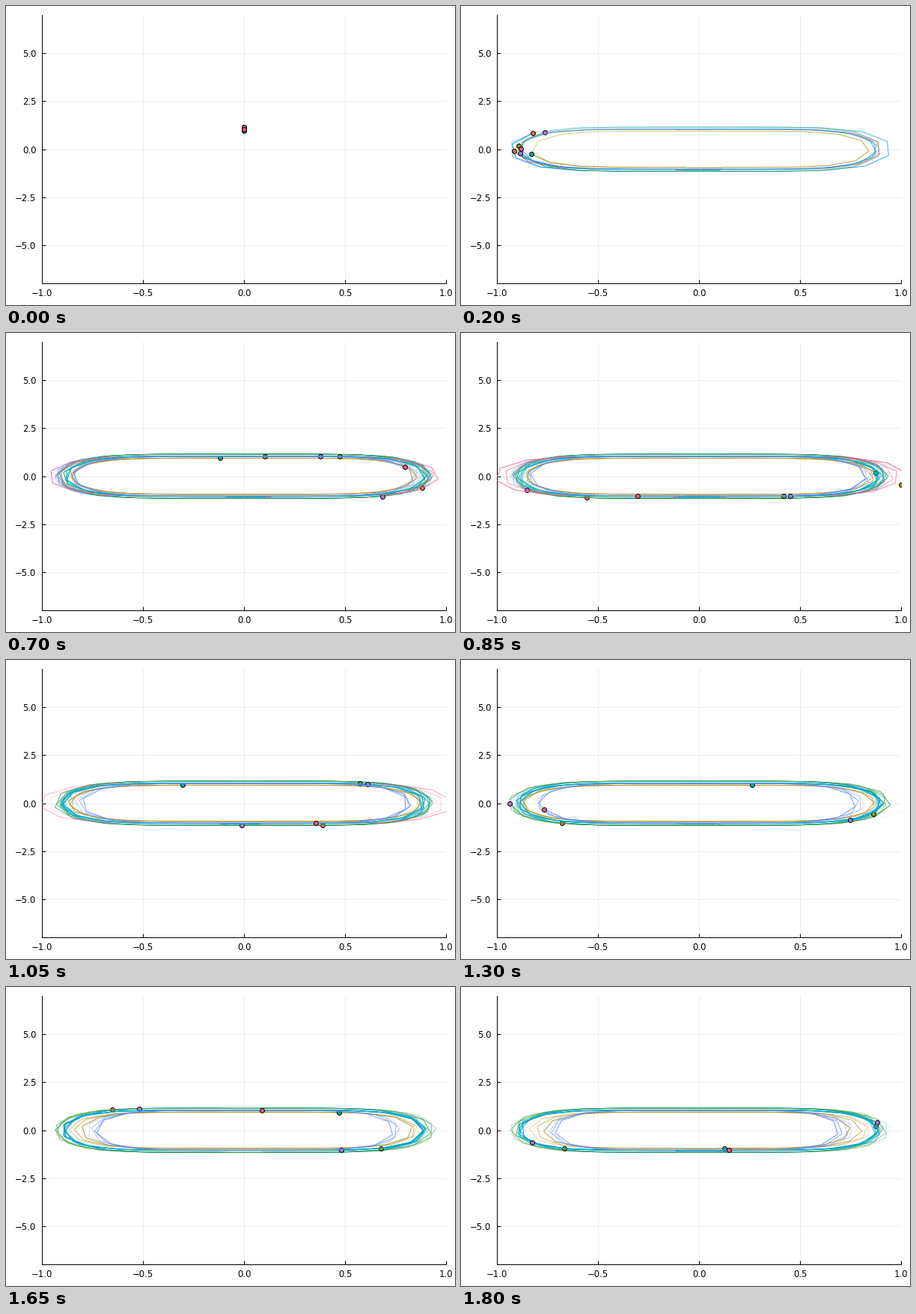
Recreate the animation shown at these times as a matplotlib script. Size 600 by 400 pixels, loop 1850 ms.

```python
import numpy as np
import matplotlib.pyplot as plt
from matplotlib.animation import FuncAnimation
from matplotlib.collections import LineCollection
from matplotlib.colors import to_rgb

DPI = 100
PX = 72 / DPI            # one pixel in points
FRAMES, INTERVAL = 37, 50
STEPS = 10               # path vertices per frame
TAIL = 100               # vertices kept in the fading trail
POWER = 6                # potential ~ |x|^POWER

plt.rcParams["font.family"] = "DejaVu Sans"


class Oscillator:
    """Anharmonic oscillator whose loop rate and reach change slowly."""

    def __init__(self, line, fill, speed, rate, reach, escape=None):
        self.line, self.fill = to_rgb(line), fill
        t = np.arange((FRAMES - 1) * STEPS + 1) / STEPS
        u = t / (FRAMES - 1)

        base, drift, bend = rate
        loops = t * (base + drift * u + bend * ((t - 22) / 14) ** 2)
        start, slope, late = reach
        amp = start + slope * u + late * u ** 6
        if escape:
            amp = start + slope * u ** 3
        amp += 0.008 * np.sin(2.3 * t + 40 * speed)

        x, p = orbit(loops)
        self.path = np.column_stack([amp * x, speed * p])
        if escape:
            self.path[t > escape] = np.nan


def unit_orbit():
    """Quarter of the orbit: position and momentum against time in 0..1."""
    w = np.linspace(0, 1, 2001)
    v = 1 - (1 - w) ** 2
    p = np.sqrt(np.maximum(0, 1 - v ** POWER))
    mid = (w[1:] + w[:-1]) / 2
    vm = 1 - (1 - mid) ** 2
    dt = 2 * (1 - mid) / np.sqrt(1 - vm ** POWER)
    t = np.concatenate([[0], np.cumsum(dt)])
    return t / t[-1], v, p


QT, QV, QP = unit_orbit()


def orbit(loops):
    quarter = (loops % 1) * 4
    up = quarter % 2
    fold = np.where(up > 1, 2 - up, up)
    x = np.interp(fold, QT, QV) * np.where(quarter < 2, 1, -1)
    p = np.interp(fold, QT, QP) * np.where((quarter < 1) | (quarter > 3), 1, -1)
    return x, p


def label(v):
    return f"{v:.1f}".replace("-", "\u2212")


# rate: loops per frame, drift, bend; reach: start, slope, late change
swarm = [
    Oscillator("#009AFA", "#E36F47", 1.15, (.4482, 0, .0028), (.95, -.07, 0)),
    Oscillator("#3EA44E", "#C371D2", 1.15, (.4550, -.0043, 0), (.89, .09, -.08)),
    Oscillator("#AC8E18", "#00AAAE", 0.945, (.4251, 0, .0045), (.83, .09, -.185)),
    Oscillator("#ED5E93", "#C68225", 1.05, (.4385, -.0216, 0), (.91, 1.2, 0),
               escape=17.5),
    Oscillator("#00A98D", "#8E971E", 1.05, (.4375, -.0047, .0022), (.89, .03, -.04)),
    Oscillator("#00A8CB", "#9B7FE9", 1.05, (.4340, .0022, 0), (.885, .015, 0)),
    Oscillator("#618DF6", "#F06073", 1.03, (.4355, .0216, 0), (.90, -.16, -.05)),
]

fig = plt.figure(figsize=(6, 4), dpi=DPI, facecolor="white")
ax = fig.add_axes([48.3 / 600, 28.6 / 400, 540 / 600, 359.6 / 400])
ax.set(xlim=(-1, 1), ylim=(-7, 7))
ax.set_axisbelow(True)
ax.grid(color="black", alpha=0.1, lw=0.7 * PX)
for side in ("top", "right"):
    ax.spines[side].set_visible(False)
for side in ("left", "bottom"):
    ax.spines[side].set_linewidth(PX)

xt, yt = np.linspace(-1, 1, 5), np.linspace(-5, 5, 5)
ax.set_xticks(xt, [label(v) for v in xt])
ax.set_yticks(yt, [label(v) for v in yt])
ax.tick_params(direction="in", length=5 * PX, width=PX, labelsize=8.4)
ax.tick_params(axis="x", pad=7 * PX)
ax.tick_params(axis="y", pad=8 * PX)

trails, dots = [], []
for z, osc in enumerate(swarm):
    trail = LineCollection([], linewidths=PX, zorder=3 + z)
    ax.add_collection(trail, autolim=False)
    dot, = ax.plot([], [], "o", ms=5.9 * PX, mfc=osc.fill, mec="black",
                   mew=PX, zorder=3.5 + z)
    trails.append(trail)
    dots.append(dot)


def draw(frame):
    end = frame * STEPS
    start = max(0, end - TAIL)
    alpha = np.linspace(0, 1, end - start)
    for osc, trail, dot in zip(swarm, trails, dots):
        pts = osc.path[start:end + 1]
        segs = np.stack([pts[:-1], pts[1:]], axis=1)
        ok = np.isfinite(segs).all(axis=(1, 2))
        trail.set_segments(list(segs[ok]))
        trail.set_color([(*osc.line, a) for a in alpha[ok]])
        dot.set_data(pts[-1:, 0], pts[-1:, 1])
    return trails + dots


anim = FuncAnimation(fig, draw, frames=FRAMES, interval=INTERVAL,
                     init_func=lambda: draw(0), repeat=True, repeat_delay=0)
plt.show()
```
